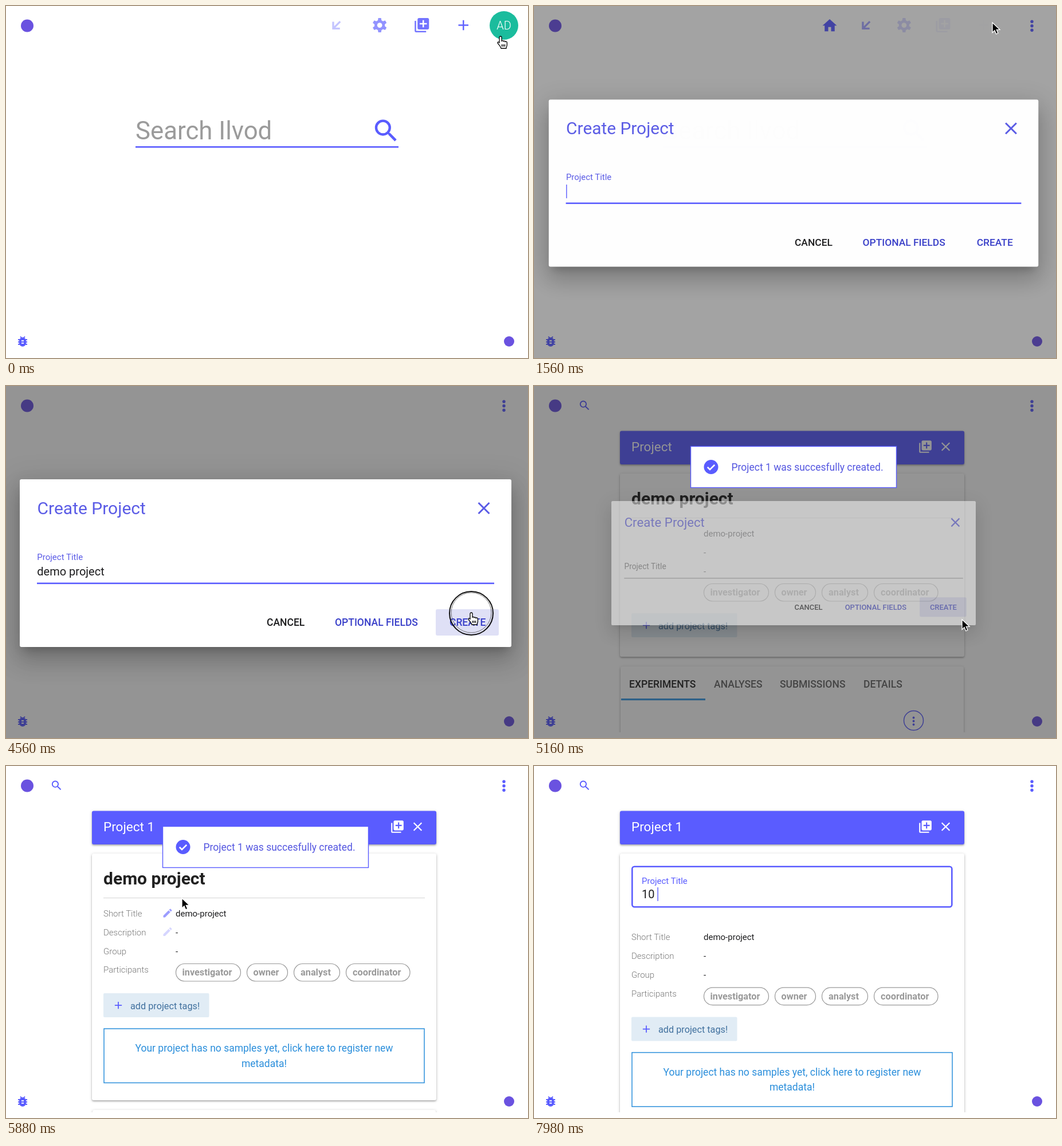
Animation of 911 by 615 pixels, one loop 8 s. Source, as an HTML page:

```html
<!DOCTYPE html>
<html lang="en">
<head>
<meta charset="utf-8">
<title>Create a project</title>
<style>
html, body { margin: 0; width: 100%; height: 100%; overflow: hidden; background: #fff; }
svg { display: block; width: 911px; height: 615px; font-family: Roboto, sans-serif; }
text { white-space: pre; }
</style>
</head>
<body>
<svg id="stage" viewBox="0 0 911 615"></svg>
<script>
const LOOP = 8000, TICK = 60;
const PURPLE = '#5a5cff', INK = '#1c1c1e', BLUE = '#2a8edb';

// Icons on a 24-unit grid
const gearTeeth = [0, 60, 120].map(a => `<path d="M10 2h4l.8 5v10l-.8 5h-4l-.8-5V7z" transform="rotate(${a} 12 12)"/>`).join('');
const ICONS = {
  home: '<path d="M10 20v-6h4v6h5v-8h3L12 3 2 12h3v8z"/>',
  arrow: '<path d="M17.2 6.8 8 16M7.4 7.2v9.4h9.4" fill="none" stroke="currentColor" stroke-width="2.7"/>',
  gear: `<mask id="hole"><rect width="24" height="24" fill="#fff"/><circle cx="12" cy="12" r="3.5" fill="#000"/></mask>
    <g mask="url(#hole)">${gearTeeth}<circle cx="12" cy="12" r="7.3"/></g>`,
  library: '<path d="M4 6H2v14c0 1.1.9 2 2 2h14v-2H4V6zm16-4H8c-1.1 0-2 .9-2 2v12c0 1.1.9 2 2 2h12c1.1 0 2-.9 2-2V4c0-1.1-.9-2-2-2zm-1 9h-4v4h-2v-4H9V9h4V5h2v4h4v2z"/>',
  plus: '<path d="M19 13h-6v6h-2v-6H5v-2h6V5h2v6h6z"/>',
  close: '<path d="M5.7 5.7 18.3 18.3M18.3 5.7 5.7 18.3" stroke="currentColor" stroke-width="2"/>',
  search: '<circle cx="9.5" cy="9.5" r="5.5" fill="none" stroke="currentColor" stroke-width="2"/><path d="M14 14.7l.7-.7h.8l5 5-1.5 1.5-5-5z"/><path d="M13.3 13.3l1.6 1.6" stroke="currentColor" stroke-width="1.6"/>',
  pencil: '<path d="M3 17.25V21h3.75L17.81 9.94l-3.75-3.75zM20.71 7.04c.39-.39.39-1.02 0-1.41l-2.34-2.34c-.39-.39-1.02-.39-1.41 0l-1.83 1.83 3.75 3.75z"/>',
  bug: '<path d="M8 3.6l3 3M16 3.6l-3 3M4 9h16M4 13h16M4 17h16" stroke="currentColor" stroke-width="2"/><path fill-rule="evenodd" d="M12 5a6 6 0 0 1 6 6v4a6 6 0 0 1-12 0v-4a6 6 0 0 1 6-6zM10 10v2h4v-2zM10 14v2h4v-2z"/>',
  check: '<circle cx="12" cy="12" r="10"/><path d="M7 12.2l3.4 3.4L17 9" fill="none" stroke="#fff" stroke-width="2"/>',
};
const POINTERS = {
  arrow: '<path d="M0 0V17.5L4 13.7l2.6 6.2 3.2-1.4L7.2 12.4H13z" fill="#000" stroke="#fff" stroke-width="1.3"/>',
  hand: '<path d="M0 0c1.5 0 2 1 2 2v6c1-1.2 3-.8 3 .6 1-1 3-.6 3 .8 1-.8 3.4-.3 3.4 1.6v4c0 2-1.4 3.5-1.4 6H1C.5 18-3 14.5-4.8 12c-1-1.5.8-3 2.3-1.6L-2 11V2C-2 1-1.5 0 0 0zM2.5 14v4M5 14v4M7.5 14v4" fill="#fff" stroke="#000" stroke-width="1.3"/>',
  beam: '<path d="M-3-9q3 0 3 2V7q0 2-3 2M3-9q-3 0-3 2V7q0 2 3 2" fill="none" stroke="#222" stroke-width="1.3"/>',
};

const ramp = (t, a, b) => Math.min(1, Math.max(0, (t - a) / (b - a)));
const easeOut = (x, n = 3) => 1 - (1 - x) ** n;
const mix = (a, b, p) => a + (b - a) * p;

const group = (body, opacity = 1, transform = '') =>
  opacity > 0 ? `<g opacity="${opacity}" transform="${transform}">${body}</g>` : '';
const rect = (x, y, w, h, fill, extra = '') => `<rect x="${x}" y="${y}" width="${w}" height="${h}" fill="${fill}" ${extra}/>`;
const circle = (x, y, r, fill, extra = '') => `<circle cx="${x}" cy="${y}" r="${r}" fill="${fill}" ${extra}/>`;
const text = (x, y, size, str, fill = INK, weight = 400, extra = '') =>
  `<text x="${x}" y="${y}" font-size="${size}" fill="${fill}" font-weight="${weight}" ${extra}>${str}</text>`;
const icon = (name, x, y, size, color = PURPLE, opacity = 1) =>
  `<g transform="translate(${x - size / 2} ${y - size / 2}) scale(${size / 24})" fill="${color}" color="${color}" opacity="${opacity}">${ICONS[name]}</g>`;
const dots = (x, y, gap, r) => [-gap, 0, gap].map(d => circle(x, y + d, r, PURPLE)).join('');
const shadow = (x, y, w, h, dy, blur, spread, alpha) =>
  rect(x - spread, y - spread + dy, w + 2 * spread, h + 2 * spread, `rgba(0,0,0,${alpha})`, `rx="3" style="filter:blur(${blur / 2}px)"`);
const card = (x, y, w, h, fill) =>
  shadow(x, y, w, h, 1, 5, 0, .2) + shadow(x, y, w, h, 2, 2, 0, .2) + rect(x, y, w, h, fill, 'rx="3"');
const caret = (x, y, h) => rect(x, y, 1.4, h, PURPLE);

const measure = document.createElement('canvas').getContext('2d');
function textWidth(str) {
  measure.font = '20px Roboto, sans-serif';
  return measure.measureText(str).width;
}

function speedDial(t) {
  const items = [['plus', 799], ['library', 728], ['gear', 657.3], ['arrow', 586.5], ['home', 516]];
  return items.map(([name, x], k) => {
    const i = k + 1;
    const shown = easeOut(ramp(t, -240 + 50 * i, 60 + 50 * i)) - easeOut(ramp(t, 1265 + 60 * i, 1565 + 60 * i));
    return group(icon(name, x, name === 'home' ? 34.3 : 33.6, 30), shown, `translate(${-15 * (1 - shown)} 0)`);
  }).join('');
}

function home(t) {
  const hover = ramp(t, 480, 600) - ramp(t, 1300, 1380);
  const tip = ramp(t, 660, 840) - ramp(t, 1300, 1400);
  return group(circle(799, 34, 25, '#dedede'), hover) + speedDial(t)
    + (t < 1320 ? circle(869, 34, 25, '#1bbc9d') + text(869, 41, 20, 'AD', '#fff', 300, 'text-anchor="middle"') : dots(869, 34.7, 7.5, 2.7))
    + text(226, 233, 43.75, 'Search Ilvod', '#9b9b9b')
    + icon('search', 663.3, 218, 52) + rect(226, 245, 459, 2.6, PURPLE)
    + (t >= 720 && t < 1320 ? caret(226, 185, 61) : '')
    + group(shadow(722, 61, 155, 48, 3, 6, 0, .35) + rect(722, 61, 155, 48, '#3d4045', 'rx="3"')
      + text(734, 90, 15, 'Create New Project', '#fff'), tip);
}

function details(t) {
  const labels = ['Short Title', 'Description', 'Group', 'Participants']
    .map((s, i) => text(170, 262.7 + 32.9 * i, 15, s, '#777', 300)).join('');
  const chips = [['investigator', 296.5, 113], ['owner', 420.5, 71], ['analyst', 502.5, 80], ['coordinator', 593.5, 111.5]]
    .map(([s, x, w]) => rect(x, 345.5, w, 30.5, 'none', 'rx="15.2" stroke="#999" stroke-width="1.2"')
      + text(x + w / 2 - 2, 366.3, 16.25, s, '#999', 700, 'text-anchor="middle"')).join('');
  const shortPencil = ramp(t, 5760, 5960) - ramp(t, 6000, 6150);
  const descPencil = ramp(t, 5640, 5760) - ramp(t, 5760, 5920);
  return group(labels, ramp(t, 5220, 5340))
    + icon('pencil', 282, 257, 20, PURPLE, shortPencil) + icon('pencil', 282, 289.5, 20, PURPLE, descPencil)
    + text(296, 262.7, 15, 'demo-project') + text(296, 295.6, 15, '-') + text(296, 328.5, 15, '-')
    + chips
    + rect(170, 397, 184.5, 42, '#e1ecf5', 'rx="2"') + icon('plus', 196, 418, 21)
    + text(217, 424.6, 16.25, 'add project tags!', '#40709e')
    + (t >= 5460 ? rect(171, 459, 559, 94.5, 'none', `stroke="${BLUE}" stroke-width="1.5"`)
      + text(450.5, 499, 17.5, 'Your project has no samples yet, click here to register new', BLUE, 400, 'text-anchor="middle"')
      + text(450.5, 525.5, 17.5, 'metadata!', BLUE, 400, 'text-anchor="middle"') : '');
}

function titleField(t) {
  const value = t < 7560 ? 'demo project' : '10 '.slice(0, Math.max(0, Math.floor((t - 7620) / 120)));
  return rect(171.3, 175.8, 558, 70.4, 'none', `rx="4" stroke="${PURPLE}" stroke-width="2.6"`)
    + text(188, 206.4, 15, 'Project Title', PURPLE) + text(188, 231, 20, value)
    + caret(188 + textWidth(value), 212, 24);
}

function project(t) {
  const editing = t >= 6660;
  const shift = editing ? 41.6 : 0;
  const bottom = (t < 5460 ? 473 : 584) + shift;
  const tabs = [['EXPERIMENTS', 166], ['ANALYSES', 314], ['SUBMISSIONS', 429], ['DETAILS', 575]]
    .map(([s, x], i) => text(x, 526.8, 17.5, s, i ? '#666' : '#222', 500)).join('');
  return icon('search', 88.3, 34, 22.5) + dots(869, 34.7, 7.5, 2.7)
    + '<clipPath id="fold"><rect width="911" height="605"/></clipPath><g clip-path="url(#fold)">'
    + card(150, 78.5, 601, 58.5, PURPLE)
    + text(170, 113.8, 22.5, t < 5280 ? 'Project' : 'Project 1', '#fff')
    + icon('library', 683, 106, 26, '#fff') + icon('close', 718.5, 106, 26, '#fff')
    + card(150, 153, 601, bottom - 153, '#fff')
    + (editing ? titleField(t) : text(170, 207, 30, 'demo project', '#212121', 700) + rect(170, 230, 561, 1, '#d4d4d4'))
    + group(details(t), 1, `translate(0 ${shift})`)
    + group(card(151, 490, 599, 200, '#fff') + tabs + rect(152, 546, 147, 3.2, '#3a9be8')
      + circle(662.5, 584.5, 17, 'none', `stroke="${PURPLE}" stroke-width="1.5"`) + dots(662.5, 585.5, 6, 1.9), 1, `translate(0 ${bottom - 473})`)
    + '</g>';
}

function dialog(t) {
  const p = easeOut(ramp(t, 1350, 1650), 4) - easeOut(ramp(t, 5110, 5410), 4);
  const cleared = t >= 5070;
  const drop = easeOut(ramp(t, 5070, 5330));
  const count = Math.floor((t - 2520) / 100);
  const value = cleared ? '' : 'demo project'.slice(0, Math.max(0, count));
  const typing = count > 0 && count < 13;
  const blink = typing || (t - 1500) % 1060 < 530;
  const box = [24, 163, 858, 293];
  const scale = mix(.5, 1, p);
  const body = shadow(...box, 11, 15, -7, .2) + shadow(...box, 24, 38, 3, .14) + shadow(...box, 9, 46, 8, .12)
    + rect(...box, '#fff', 'rx="3"')
    + text(54.5, 223.5, 30, 'Create Project', '#5b5ce6') + icon('close', 834, 213.5, 36, '#5b5ce6')
    + text(54.3, mix(304, 331, drop), mix(15, 20, drop), 'Project Title', cleared ? '#777' : '#5b5ce6')
    + text(54.3, 331, 20, value)
    + rect(54, cleared ? 344.5 : 343.5, 798, cleared ? 1.2 : 2.6, cleared ? '#777' : PURPLE)
    + (!cleared && t < 4560 && blink ? caret(54.5 + textWidth(value), 312, 24) : '')
    + (t >= 4440 ? rect(750, 390, 110, 46, 'rgba(60,65,200,.16)', 'rx="3"') : '')
    + text(455, 419.3, 17.5, 'CANCEL', INK, 500)
    + text(574, 419.3, 17.5, 'OPTIONAL FIELDS', '#393fc9', 500) + text(774, 419.3, 17.5, 'CREATE', '#393fc9', 500);
  return group(body, p, `translate(453 309.6) scale(${scale}) translate(-453 -309.6)`);
}

function toast(t) {
  return group(rect(273.5, 105.5, 359, 72, '#fff', `stroke="${PURPLE}" stroke-width="1.4"`)
    + icon('check', 309, 141.5, 30) + text(344.5, 148, 17.5, 'Project 1 was succesfully created.', '#5456e0'),
    ramp(t, 4980, 5100) - ramp(t, 7140, 7260));
}

// time, x, y of the pointer tip
const PATH = [[0, 863, 53], [60, 863, 53], [600, 800, 31], [1320, 800, 29], [2040, 800, 29], [2520, 455, 325],
  [3720, 450, 330], [4380, 812, 396], [5040, 812, 396], [5160, 747, 408], [5880, 307, 231], [6300, 340, 200], [8000, 340, 200]];

function pointer(t) {
  if ((t >= 2640 && t < 3720) || t >= 7560) return '';
  const i = PATH.findIndex(k => k[0] > t) - 1;
  const [t0, x0, y0] = PATH[i], [t1, x1, y1] = PATH[i + 1];
  const p = ramp(t, t0, t1), ease = t0 === 5160 ? p : p * p * (3 - 2 * p);
  const x = mix(x0, x1, ease), y = mix(y0, y1, ease);
  const kind = t < 1320 || (t >= 4260 && t < 5100) ? 'hand'
    : (t >= 2460 && t < 3900) || t >= 6660 ? 'beam' : 'arrow';
  const click = [1200, 4560, 6480].find(c => t >= c && t < c + 240);
  let ring = '';
  if (click !== undefined) {
    const q = (t - click) / 240;
    ring = group(circle(x, y + 1, 38 + 8 * q, 'none', 'stroke="#111" stroke-width="2"')
      + circle(x, y, 35 + 8 * q, 'none', 'stroke="#555" stroke-width=".8"'), 1 - q);
  }
  return ring + group(POINTERS[kind], 1, `translate(${x} ${y})`);
}

function scene(t) {
  const scrim = .48 * (ramp(t, 1320, 1600) - ramp(t, 5180, 5400));
  return circle(37, 34.5, 11, '#6a52e0') + circle(878, 586, 9, '#6a52e0') + icon('bug', 29, 586, 24)
    + (t < 1860 ? home(t) : t < 4980 ? dots(869, 34.7, 7.5, 2.7) : project(t))
    + rect(0, 0, 911, 615, '#212121', `opacity="${scrim}"`)
    + dialog(t) + toast(t) + pointer(t);
}

const stage = document.getElementById('stage');
let last = -1;
function draw() {
  const t = Math.floor(performance.now() % LOOP / TICK) * TICK;
  if (t !== last) stage.innerHTML = scene(last = t);
  requestAnimationFrame(draw);
}
draw();
</script>
</body>
</html>
```
